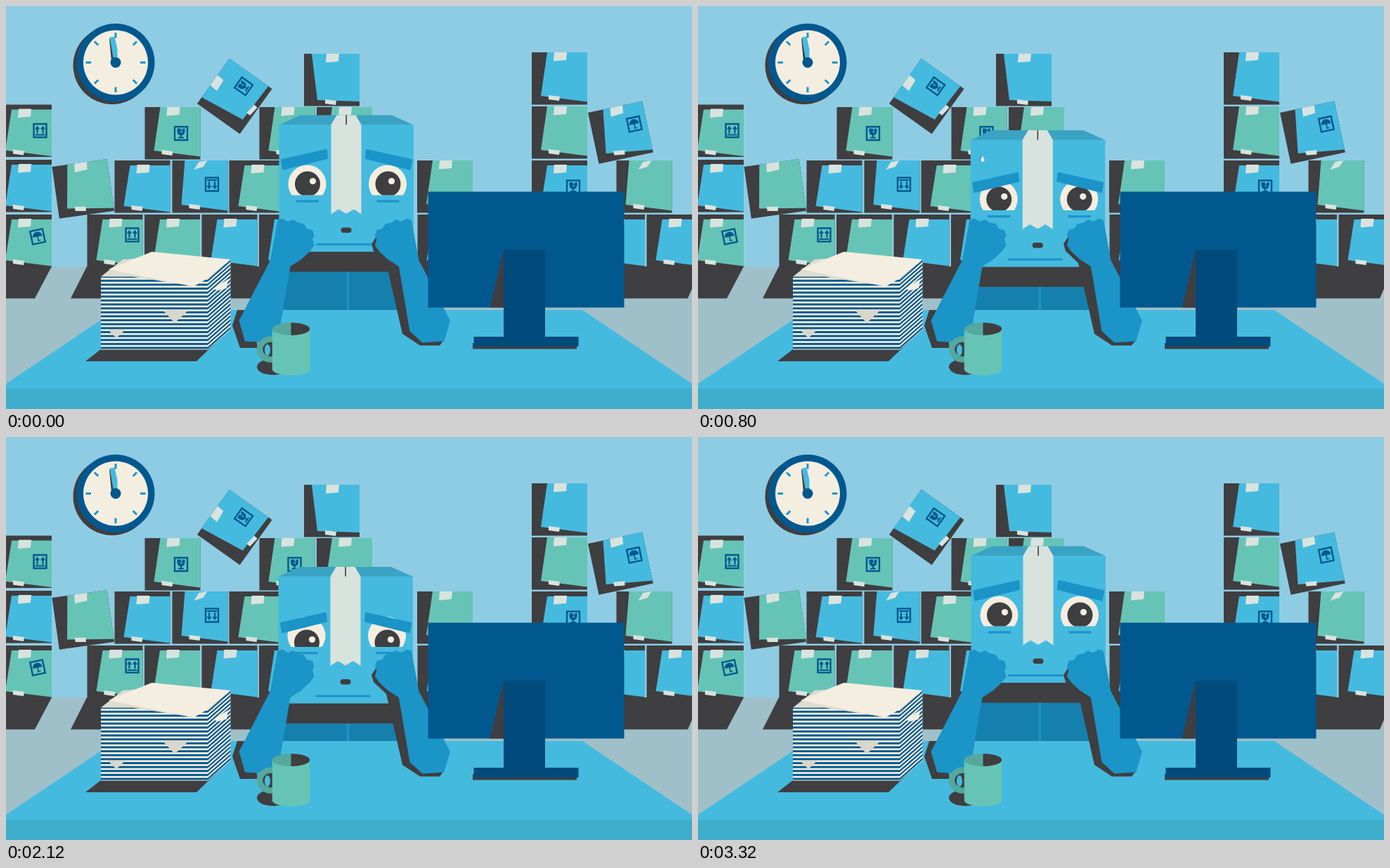
Write an HTML page with a canvas that moves like this. It is 976 by 574 pixels and loops after 4.32 s.

```html
<!DOCTYPE html>
<html lang="en">
<head>
<meta charset="utf-8">
<title>Worried box at the desk</title>
<style>
html, body { margin: 0; width: 100%; height: 100%; overflow: hidden; background: #8ecce4; }
canvas { display: block; }
</style>
</head>
<body>
<canvas id="stage" width="976" height="574"></canvas>
<script>
const c = document.getElementById('stage').getContext('2d');
const LOOP = 4320, STEP = 40, REST = 3320;
const DARK = '#3f3e40', BLUE = '#45badf', GREEN = '#66c4b6', MID = '#1b94c8',
  NAVY = '#01588f', DEEP = '#004a7c', CREAM = '#f4eee0', TAPE = '#d9e3de',
  FOLD = '#d9d6cb', TEAL = '#54a89d';

// ---------- drawing helpers ----------
function trace(...p) {
  c.beginPath();
  for (let i = 0; i < p.length; i += 2) c.lineTo(p[i], p[i + 1]);
  c.closePath();
}
function poly(color, ...p) {
  c.fillStyle = color;
  trace(...p);
  c.fill();
}
function rect(color, x, y, w, h) {
  c.fillStyle = color;
  c.fillRect(x, y, w, h);
}
function round(color, x, y, w, h, r) {
  c.fillStyle = color;
  c.beginPath();
  c.roundRect(x, y, w, h, r);
  c.fill();
}
function oval(color, x, y, rx, ry = rx, from = 0, to = 7) {
  c.fillStyle = color;
  c.beginPath();
  c.ellipse(x, y, rx, ry, 0, from, to);
  c.fill();
}
function at(x, y, deg, draw) {
  c.save();
  c.translate(x, y);
  c.rotate(deg * Math.PI / 180);
  draw();
  c.restore();
}
// draws once as given and once reflected about a vertical axis
function twice(axis, draw) {
  draw();
  c.save();
  c.translate(2 * axis, 0);
  c.scale(-1, 1);
  draw();
  c.restore();
}

// ---------- box labels ----------
const glyphs = {
  up() {
    for (const x of [-4, 4]) {
      poly(NAVY, x, -7, x + 3.6, -2, x - 3.6, -2);
      rect(NAVY, x - 1.1, -3, 2.2, 7);
    }
    rect(NAVY, -7, 5, 14, 2);
  },
  down() {
    c.scale(1, -1);
    glyphs.up();
  },
  glass() {
    oval(NAVY, 0, -3, 5.5, 6, 0, Math.PI);
    rect(NAVY, -5.5, -7, 11, 4.2);
    rect(NAVY, -1, 2, 2, 4);
    rect(NAVY, -4, 5, 8, 2);
    poly(BLUE, -1, -7, 3, -7, 1, -4, 2, 0, -1, -2, 1, -4);
  },
  umbrella() {
    oval(NAVY, 0, 0, 7, 7, Math.PI, 2 * Math.PI);
    rect(NAVY, -0.8, -1, 1.6, 7.5);
    rect(NAVY, -0.8, 5, 4, 1.6);
  }
};
function label(kind, x, y, deg = 0) {
  at(x, y, deg, () => {
    c.strokeStyle = NAVY;
    c.lineWidth = 2.4;
    c.strokeRect(-9, -9.5, 18, 19);
    glyphs[kind]();
  });
}

// ---------- boxes ----------
const FLAT = { lid: 0, left: 22, foot: 13, low: 62, drop: 8.5 };
const LIDDED = { ...FLAT, lid: 7, low: 65 };
const CREASED = { ...FLAT, left: 18, low: 63 };
const LEANING = { ...FLAT, left: 11, foot: 19, low: 66, drop: 2 };
const WIDE = 79, PITCH = 81.5;

function box(color, s) {
  const { lid, low } = s;
  rect(DARK, 0, 0, WIDE, 74.5);
  poly(color, s.left, lid, WIDE, lid, WIDE, low + s.drop, s.foot, low);
  const top = Math.max(0, lid - 1);
  if (s === CREASED) poly(TAPE, 31, 13, 38, 2, 50, 0, 44, 9);
  else poly(TAPE, 32, top, 50, top, 49, top + 11, 31, top + 12.5);
  const x = s.foot + 11;
  poly(TAPE, x, low - 1, x + 16, low + 1, x + 15, low + 7, x, low + 5);
}
// one letter per box, a space leaves a gap
function row(x, y, letters, style) {
  [...letters].forEach((k, i) => {
    if (k !== ' ') at(x + i * PITCH, y, 0, () => box(k === 'G' ? GREEN : BLUE, style));
  });
}
function tilted(x, y, deg, color, style, ...mark) {
  at(x, y, deg, () => {
    box(color, style);
    if (mark.length) label(...mark);
  });
}
function boxes() {
  poly(DARK, 0, 371, 65, 371, 41, 416.5, 0, 416.5);
  poly(DARK, 115, 371, 990, 371, 970, 416.5, 92, 416.5);

  row(-14, 140.5, 'G', LIDDED);
  row(-14, 219, 'B', LIDDED);
  row(-14, 297, 'G', LIDDED);

  row(424, 68, 'B', LEANING);
  row(748, 66, 'B', FLAT);
  row(748, 143, 'G', FLAT);
  row(197.5, 144, 'G GG', FLAT);
  row(154.5, 220, 'B G', LIDDED);
  row(236.5, 220, 'B', CREASED);
  row(585, 220, 'G', FLAT);
  row(748, 220, 'B', LIDDED);
  row(868.5, 220, 'G', CREASED);
  row(115.5, 297, 'GGBB', LIDDED);
  row(585.5, 297, 'B  BB', LIDDED);

  tilted(65.5, 229, -8, GREEN, FLAT);
  tilted(828, 152, -12, BLUE, FLAT, 'umbrella', 61, 29.5);
  tilted(272, 139, -54.5, BLUE, LEANING, 'glass', 58.5, 39.5);

  label('up', 48.5, 177.5);
  label('umbrella', 45, 328.5, -12);
  label('down', 293, 254);
  label('up', 179.5, 326);
  for (const x of [249, 410.5]) label('glass', x, 181.5);
  label('glass', 807, 258);
}

function clock() {
  oval(DARK, 151, 84.5, 55.5);
  at(156, 80.5, 0, () => {
    oval(NAVY, 0, 0, 55.5);
    oval(CREAM, 0, 0, 46);
    for (let a = 0; a < 360; a += 45)
      at(0, 0, a, () => rect(MID, -1.5, -42.5, 3, 7.5));
    poly(DARK, -9, -34, -6, -34, 0, -2, -6, -2);
    poly(BLUE, -8.5, -36, -1.5, -37, 2.5, -19, 2.5, -4, -3, -4);
    oval(NAVY, 0, 0, 7.5);
  });
}

function room() {
  rect('#8ecce4', 0, 0, 976, 574);
  rect('#9fc0c9', 0, 371, 976, 203);
  clock();
  boxes();
  rect('#1580ad', 388, 350, 172, 84);
  rect(MID, 484.5, 350, 3.5, 83);
  poly(BLUE, 156, 433, 820, 433, 976, 538, 976, 546, 0, 546, 0, 538);
  rect('#3eadcc', 0, 545.5, 976, 29);
}

// ---------- character ----------
function eye(x, shine, gaze) {
  c.save();
  c.beginPath();
  c.rect(x - 30, 220, 60, 49.5);
  c.clip();
  oval(CREAM, x, 253.5, 27);
  oval(DARK, x + 0.5, 253.5 + gaze, 18);
  oval(CREAM, x + shine, 249.5 + gaze, 4.6);
  c.restore();
  rect(MID, x - 15.5, 276.5, 32, 3.2);
}
function drop(x, age) {
  if (age < 0 || age > 1250) return;
  const size = Math.min(1, 0.5 + age / 300);
  at(x, 178 + age * 0.045, 0, () => {
    c.scale(size, size);
    for (const [color, dx] of [[MID, -1.2], [CREAM, 0.4]]) {
      oval(color, dx, 1.6, 2.6);
      poly(color, dx, -4.5, dx + 2.5, 1, dx - 2.5, 1);
    }
  });
}
function brow() {
  poly(MID, 392.5, 219.5, 455.5, 205.5, 456.5, 216.5, 394.5, 232);
  c.strokeStyle = MID;
  c.lineWidth = 3;
  c.lineJoin = 'round';
  c.stroke();
  c.lineJoin = 'miter';
}
function head({ sink, gaze }, t) {
  c.save();
  c.translate(-sink, sink * 29.5);
  rect(DARK, 390, 349, 172, 29.5);
  poly('#3aa3c4', 388.5, 169.5, 418, 155.5, 549, 155.5, 580, 169.5);
  rect(BLUE, 388.5, 169, 191.5, 181);
  twice(484, () => poly(TAPE, 462.5, 169, 470.5, 155.5, 484.2, 155.5,
    484.2, 296, 473, 289.5, 462.5, 296.5));
  rect(DARK, 483.3, 155.5, 1.6, 13.5);

  eye(428.5, 8, gaze);
  eye(543, 5.5, gaze);
  drop(405, t - 400);
  drop(550, t - 860);
  at(0, 16.3 * sink ** 1.25, 0, () => twice(484.5, brow));

  round(DARK, 476.5, 315.5, 15, 7.5, 3.7);
  round(MID, 441, 338, 79, 3, 1.5);
  c.restore();
}
function arm() {
  poly(MID, 386.5, 305, 393, 302.5, 401, 307, 409, 304, 414, 308, 424, 310.5, 428, 317,
    436, 319, 438.5, 327, 436, 332, 438.5, 341, 432, 350, 420, 361, 404.5, 371,
    389, 463, 371, 479.5, 340, 477.5, 331.5, 448, 376, 362);
}
function arms() {
  poly(DARK, 329, 433, 350, 433, 358, 487, 333, 487, 322, 455);
  poly(DARK, 527, 328, 520, 339, 523, 349, 541, 366, 564, 467, 589, 483.5,
    617, 483.5, 622, 477, 590, 470, 570, 370);
  twice(481.7, arm);
}

// ---------- desk items ----------
function papers() {
  const stripe = 2.9, pitch = 5.63;
  poly(DARK, 135, 489, 287, 489, 319, 460, 271, 506, 113, 506);
  c.save();
  trace(135, 385, 287, 388, 319.5, 361, 319.5, 461, 287, 489.5, 135, 489.5);
  c.clip();
  rect(CREAM, 135, 350, 190, 145);
  for (let y = 384.2; y < 520; y += pitch) {
    rect(NAVY, 135, y, 152, stripe);
    poly(NAVY, 287, y, 320, y - 29, 320, y - 29 + stripe, 287, y + stripe);
  }
  c.restore();
  poly('#dfdcd0', 135, 385.5, 166, 361, 207, 358, 267, 399, 180, 385.5);
  poly(CREAM, 146, 375, 207.5, 350, 319.5, 361, 287, 388, 267, 399.5);
  poly(FOLD, 222, 432, 260, 433, 240, 451.5);
  poly(FOLD, 145, 461, 170, 461, 157, 473);
  poly(CREAM, 294, 403, 316, 389, 314, 402, 303, 405);
}
function mug() {
  const x = 405.5, r = 26.7;
  oval(DARK, 380, 514, 23, 11.5);
  oval(DARK, 377, 489, 13, 12);
  oval(BLUE, 372, 490, 4, 8);
  c.strokeStyle = TEAL;
  c.lineWidth = 8.5;
  c.beginPath();
  c.ellipse(377, 489, 16, 14.5, 0, 0, 7);
  c.stroke();
  rect(GREEN, x - r, 460, 2 * r, 58);
  oval(GREEN, x, 517.5, r, 8.5);
  oval(TEAL, x, 460, r, 9);
  oval(DARK, x, 460, r, 9, -Math.PI / 2, Math.PI / 2);
}
function monitor() {
  rect(NAVY, 600.5, 264.5, 279, 165);
  poly(DARK, 708, 347, 708, 429.5, 688.5, 429.5);
  rect(DARK, 664, 480, 148, 8.5);
  rect(DEEP, 708, 347, 59, 126);
  rect(DEEP, 665.5, 471, 149, 14);
}

// ---------- motion ----------
function ramp(t, from, to) {
  const u = Math.min(1, Math.max(0, (t - from) / (to - from)));
  return u * u * (3 - 2 * u);
}
function poseAt(t) {
  const rise = 1 - ramp(t, 2345, 3330);
  // quick start, long settle
  const fall = ramp(1 - (1 - Math.min(1, t / 1530)) ** 1.46, 0, 1);
  return { sink: t < REST ? fall * rise : 0, gaze: 9.5 * ramp(t, 700, 1720) * rise };
}

function frame(now) {
  const t = Math.min(REST, Math.floor((now % LOOP) / STEP) * STEP);
  room();
  head(poseAt(t), t);
  arms();
  papers();
  mug();
  monitor();
}
const begin = performance.now();
function tick() {
  frame(performance.now() - begin);
  requestAnimationFrame(tick);
}
tick();
</script>
</body>
</html>
```
